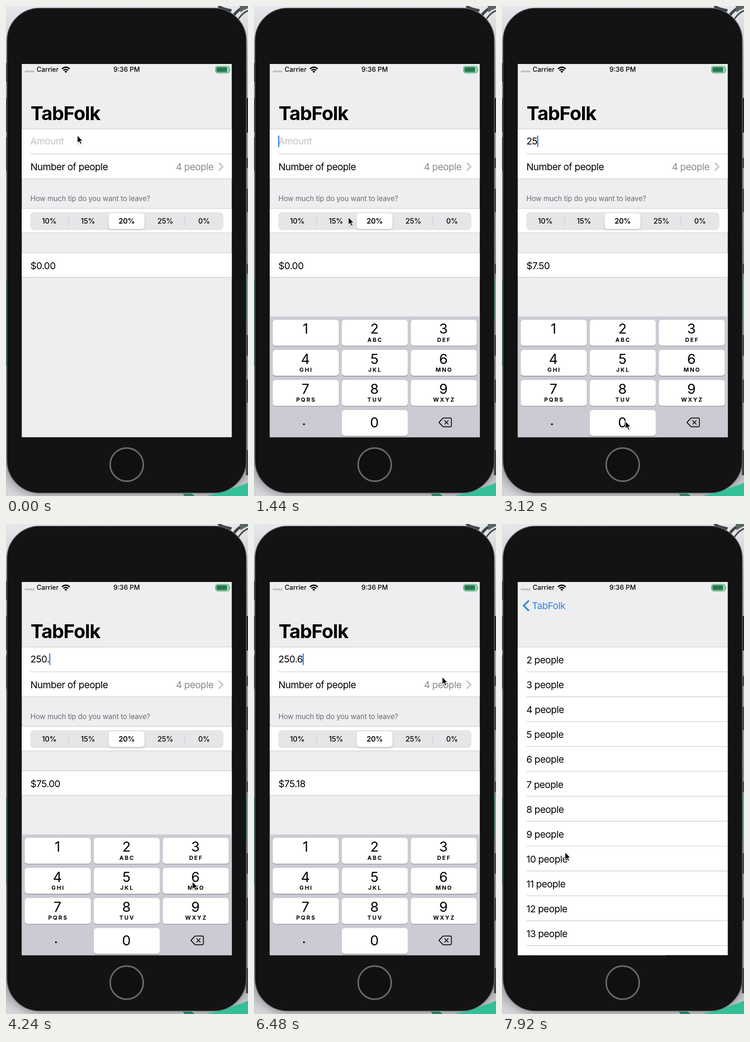
Animation, 526 px wide and 1065 px high, one loop 8000 ms. Source, as an HTML page:

```html
<!DOCTYPE html>
<html lang="en">
<head>
<meta charset="utf-8">
<title>Bill splitter</title>
<style>
  html, body { margin: 0; width: 100%; height: 100%; overflow: hidden; background: #d9dadd; }
  svg { display: block; width: 526px; height: 1065px; }
  text { font-family: Inter, Roboto, sans-serif; white-space: pre; }
  .body { font-size: 20.7px; letter-spacing: -.026em; }
  .small { font-size: 15.6px; letter-spacing: -.012em; }
  .status { font-size: 14.4px; font-weight: 500; }
  .mid { text-anchor: middle; }
  .digit { font-size: 30px; text-anchor: middle; }
  .letters { font-size: 12.2px; font-weight: 700; letter-spacing: 2.4px; text-anchor: middle; }
  .line { stroke: #c9c8cd; stroke-width: 1.2; }
</style>
</head>
<body>
<svg viewBox="0 0 526 1065">
  <defs>
    <clipPath id="screenClip"><rect x="34.3" y="126" width="456.4" height="811.3"/></clipPath>
    <linearGradient id="wall" x2="0" y2="1">
      <stop offset="0" stop-color="#e6e7ea"/><stop offset=".15" stop-color="#c4c5c7"/>
      <stop offset=".5" stop-color="#9c9d9f"/><stop offset=".9" stop-color="#a6a7a9"/>
      <stop offset="1" stop-color="#d6d8dc"/>
    </linearGradient>
    <linearGradient id="edge">
      <stop offset="0" stop-color="#28344c" stop-opacity="0"/>
      <stop offset="1" stop-color="#28344c" stop-opacity=".1"/>
    </linearGradient>
    <filter id="soft" x="-10%" y="-10%" width="120%" height="120%"><feGaussianBlur stdDeviation="10"/></filter>
    <filter id="lift" x="-20%" y="-20%" width="140%" height="150%">
      <feDropShadow dx="0" dy="2" stdDeviation="2" flood-opacity=".18"/>
    </filter>
  </defs>

  <!-- Desktop behind the phone -->
  <rect width="526" height="1065" fill="url(#wall)"/>
  <rect x="4" y="30" width="518" height="1035" rx="72" opacity=".3" filter="url(#soft)"/>
  <g fill="none" stroke="#3d4243">
    <path d="M462 0Q468 6 490 10M494 22Q506 4 526 0" stroke-width="6"/>
    <path d="M503 32Q512 16 526 10" stroke-width="3"/>
    <path d="M524 330V352M524 397V448M524 560V582M524 715V760M524 812V862M524 965V1020" stroke-width="5"/>
  </g>
  <path d="M508 0H526V5Q517 8 510 14Z" fill="#596463"/>
  <path d="M0 594H4V782H0Z" fill="#2b5b4d"/>
  <path d="M522 592H526V684H522Z" fill="#2fbf96"/>
  <path d="M436 1065Q490 1052 526 1036V1065Z" fill="#33bf98"/>
  <path d="M384 1060H404L410 1065H388Z" fill="#287e66"/>
  <path d="M0 124H4V165H0ZM0 200H4V274H0ZM0 285H4V358H0ZM521 200H526V275H521Z" fill="#1d1e1f"/>

  <!-- Phone -->
  <rect x="2" y="4.5" width="520.5" height="1054" rx="71" fill="#131313" stroke="#62676b" stroke-width="1.6"/>
  <circle cx="262.4" cy="996.8" r="36" fill="#101010" stroke="#68686a" stroke-width="3.4"/>

  <g clip-path="url(#screenClip)">
    <g id="mainPage">
      <rect x="34" y="126" width="458" height="812" fill="#eeeef0"/>
      <path d="M34 267.5H492V375.5H34ZM34 440H492V493H34ZM34 536.5H492V589.5H34Z" fill="#fff"/>
      <rect id="rowTap" x="34" y="321" width="458" height="54.5" fill="#cacacb"/>
      <path class="line" d="M34 267.5H492M53 321.3H492M34 375.5H492M34 439.8H492M34 493H492M34 536.4H492M34 589.7H492"/>
      <text id="amount" class="body" x="53" y="301"></text>
      <rect id="caret" y="281.5" width="2.5" height="25" fill="#2f7fe2"/>
      <text class="body" x="53" y="357">Number of people</text>
      <text class="body" x="451" y="357" text-anchor="end" fill="#8b8b8f">4 people</text>
      <path d="M462.5 340.5 471 349.2 462.5 358" fill="none" stroke="#c3c3c6" stroke-width="3"/>
      <text class="small" x="53" y="424" fill="#6d6d72">How much tip do you want to leave?</text>
      <rect x="52.5" y="448" width="420" height="39" rx="8.5" fill="#e6e6e9"/>
      <path d="M136 457V479M388 457V479" stroke="#cfcfd3" stroke-width="1.2"/>
      <rect x="223" y="450.5" width="78" height="34" rx="7" fill="#fff" filter="url(#lift)"/>
      <g id="tips"></g>
      <text id="total" class="body" x="53" y="571.5"></text>
      <g id="keyboard"><rect x="34" y="674.8" width="458" height="264" fill="#cbccd3"/></g>
      <rect id="dim" x="34" y="126" width="458" height="812" fill="#0a0f18"/>
    </g>
    <g id="listPage">
      <rect x="-26" y="126" width="60.3" height="812" fill="url(#edge)"/>
      <rect x="34.3" y="126" width="458" height="142" fill="#eeeef0"/>
      <rect x="34.3" y="267.5" width="458" height="670" fill="#fff"/>
      <path class="line" d="M34.3 267.5H492"/>
      <g id="rows"></g>
    </g>
    <text id="largeTitle" font-weight="700" letter-spacing="-.025em">TabFolk</text>
    <text id="backTitle" fill="#2e82e2" letter-spacing="-.026em">TabFolk</text>
    <path id="backArrow" d="M58.5 166.5 47 177.5 58.5 188.8" fill="none" stroke="#2e82e2" stroke-width="3.4"/>

    <!-- Status bar -->
    <g fill="#bababe">
      <rect x="41" y="140" width="4.4" height="4.4" rx="1.4"/><rect x="46.4" y="140" width="4.4" height="4.4" rx="1.4"/>
      <rect x="51.8" y="140" width="4.4" height="4.4" rx="1.4"/><rect x="57.2" y="140" width="4.4" height="4.4" rx="1.4"/>
    </g>
    <text class="status" x="66.5" y="143.3">Carrier</text>
    <text class="status mid" x="262.3" y="143.3">9:36 PM</text>
    <g fill="none" stroke="#000" stroke-width="2.7">
      <path d="M121.6 136.6Q130 129.4 138.4 136.6M124.7 140Q130 135.6 135.3 140"/>
    </g>
    <path d="M127 142.2Q130 139.8 133 142.2L130 145.4Z"/>
    <rect x="455.5" y="131" width="30" height="14.6" rx="4.5" fill="#8ce5a8" stroke="#3f9d68" stroke-width="1.2"/>
    <rect x="457.6" y="133" width="23" height="10.6" rx="2.6" fill="#2f7554"/>
    <path d="M486.3 136Q488.3 138.3 486.3 140.6Z" fill="#3f9d68"/>
  </g>

  <path id="pointer" d="M0 0V17L3.9 13.4 6.6 19.6 9.5 18.3 6.8 12.3H12Z" stroke="#fff" stroke-width="1.2" filter="url(#lift)"/>
</svg>
<script>
const LOOP = 8000, STEP = 80;
const $ = id => document.getElementById(id);
const clamp = x => Math.min(1, Math.max(0, x));
const mix = (a, b, p) => a + (b - a) * p;
const easeOut = u => 1 - (1 - clamp(u)) ** 3;
const easeInOut = u => u * u * (3 - 2 * u);
const add = (id, markup) => $(id).insertAdjacentHTML('beforeend', markup);

['10%', '15%', '20%', '25%', '0%'].forEach((tip, i) =>
  add('tips', `<text class="small mid" font-weight="${i === 2 ? 600 : 500}" x="${94 + 84.1 * i}" y="473">${tip}</text>`));

for (let i = 0; i < 13; i++) {
  const y = 54.1 * i;
  add('rows', `<text class="body" x="53" y="${303 + y}">${i + 2} people</text>
    <path class="line" d="M53 ${321.3 + y}H492"/>`);
}

const LETTERS = ['', 'ABC', 'DEF', 'GHI', 'JKL', 'MNO', 'PQRS', 'TUV', 'WXYZ'];
[...'123456789.0<'].forEach((key, i) => {
  const x = 41 + 150 * (i % 3), y = 682 + 65.4 * Math.floor(i / 3), cx = x + 71.3;
  const plain = key === '.' || key === '<';
  if (!plain) add('keyboard', `<rect x="${x}" y="${y + 1.4}" width="143" height="56.4" rx="6" fill="#8b8c91"/>`);
  add('keyboard', `<rect id="key${key}" x="${x}" y="${y}" width="143" height="56.4" rx="6" fill="${plain ? 'none' : '#fff'}"/>`);
  if (key === '<') {
    add('keyboard', `<g fill="none" stroke="#111" stroke-width="1.9" stroke-linejoin="round">
      <path d="M402 905 410 896.5Q411 895.5 412.5 895.5H426Q429 895.5 429 898.5V911.5Q429 914.5 426 914.5H412.5Q411 914.5 410 913.5Z"/>
      <path d="M414 900.7 422.6 909.3M422.6 900.7 414 909.3"/></g>`);
  } else {
    const baseline = key === '0' ? 915.5 : key === '.' ? 911 : y + 30.2;
    add('keyboard', `<text class="digit" x="${key === '.' ? 108.5 : cx - .5}" y="${baseline}">${key}</text>
      <text class="letters" x="${cx + 1}" y="${y + 47.6}">${LETTERS[i] || ''}</text>`);
  }
});

const PRESSES = [[2240, '2'], [2720, '5'], [3200, '0'], [3760, '.'], [4400, '6']];
const FOCUS = 240, ROW_TAP = 6640, PUSH = 6800;

// Pointer stops: time, x, y
const STOPS = [
  [0, 155, 281], [160, 155, 281], [560, 157, 284], [1040, 160, 300], [2000, 280, 722], [2320, 281, 726],
  [2400, 281, 727], [2660, 277, 785], [2840, 277, 785], [3120, 268, 902], [3320, 268, 902],
  [3680, 114, 902], [3880, 114, 902], [4240, 405, 777], [4700, 406, 778], [5400, 408, 700],
  [6240, 409, 340], [6480, 409, 332], [6640, 414, 342], [6800, 420, 346], [7120, 421, 347],
  [7840, 138, 712], [8000, 136, 714]
];

function pointerAt(t) {
  const i = STOPS.findIndex(stop => stop[0] > t);
  const [t0, x0, y0] = STOPS[i - 1], [t1, x1, y1] = STOPS[i];
  const p = easeInOut((t - t0) / (t1 - t0));
  return [mix(x0, x1, p), mix(y0, y1, p)];
}

const typedBy = t => PRESSES.filter(([at]) => at <= t).map(press => press[1]).join('');

function setTitle(id, p, opacity) {
  const el = $(id);
  el.setAttribute('x', mix(53.5, 65, p));
  el.setAttribute('y', mix(248.3, 184.7, p));
  el.setAttribute('font-size', mix(41.4, 20.7, p));
  el.setAttribute('opacity', clamp(opacity));
}

function render(t) {
  const typed = typedBy(t);
  $('amount').textContent = typed || 'Amount';
  $('amount').setAttribute('fill', typed ? '#000' : '#c3c3c7');
  $('total').textContent = '$' + (Number(typedBy(t - 120)) * 1.2 / 4).toFixed(2);

  const lastInput = Math.max(FOCUS, ...PRESSES.map(([at]) => at <= t ? at : 0));
  $('caret').setAttribute('x', typed ? 52.6 + $('amount').getComputedTextLength() : 52.5);
  $('caret').setAttribute('opacity', t >= FOCUS && (t - lastInput) % 1000 < 560 ? 1 : 0);

  for (const [at, key] of PRESSES) {
    const down = t >= at && t < at + 160, dot = key === '.';
    $('key' + key).setAttribute('fill', down ? (dot ? '#fff' : '#bbbcc0') : dot ? 'none' : '#fff');
  }
  $('keyboard').setAttribute('transform', `translate(0 ${264 * (1 - easeOut((t - 160) / 480))})`);

  const push = easeOut((t - PUSH) / 500);
  $('rowTap').setAttribute('opacity', t >= ROW_TAP ? 1 : 0);
  $('mainPage').setAttribute('transform', `translate(${-137 * push} 0)`);
  $('dim').setAttribute('opacity', .1 * push);
  $('listPage').setAttribute('transform', `translate(${456.5 * (1 - push)} 0)`);
  $('listPage').setAttribute('opacity', push > 0 ? 1 : 0);
  setTitle('largeTitle', push, 1 - push * 1.4);
  setTitle('backTitle', push, push * 1.4 - .2);
  $('backArrow').setAttribute('opacity', clamp((push - .87) / .12));

  $('pointer').setAttribute('transform', `translate(${pointerAt(t)})`);
}

function tick() {
  render(Math.floor(performance.now() % LOOP / STEP) * STEP);
  requestAnimationFrame(tick);
}
tick();
</script>
</body>
</html>
```
